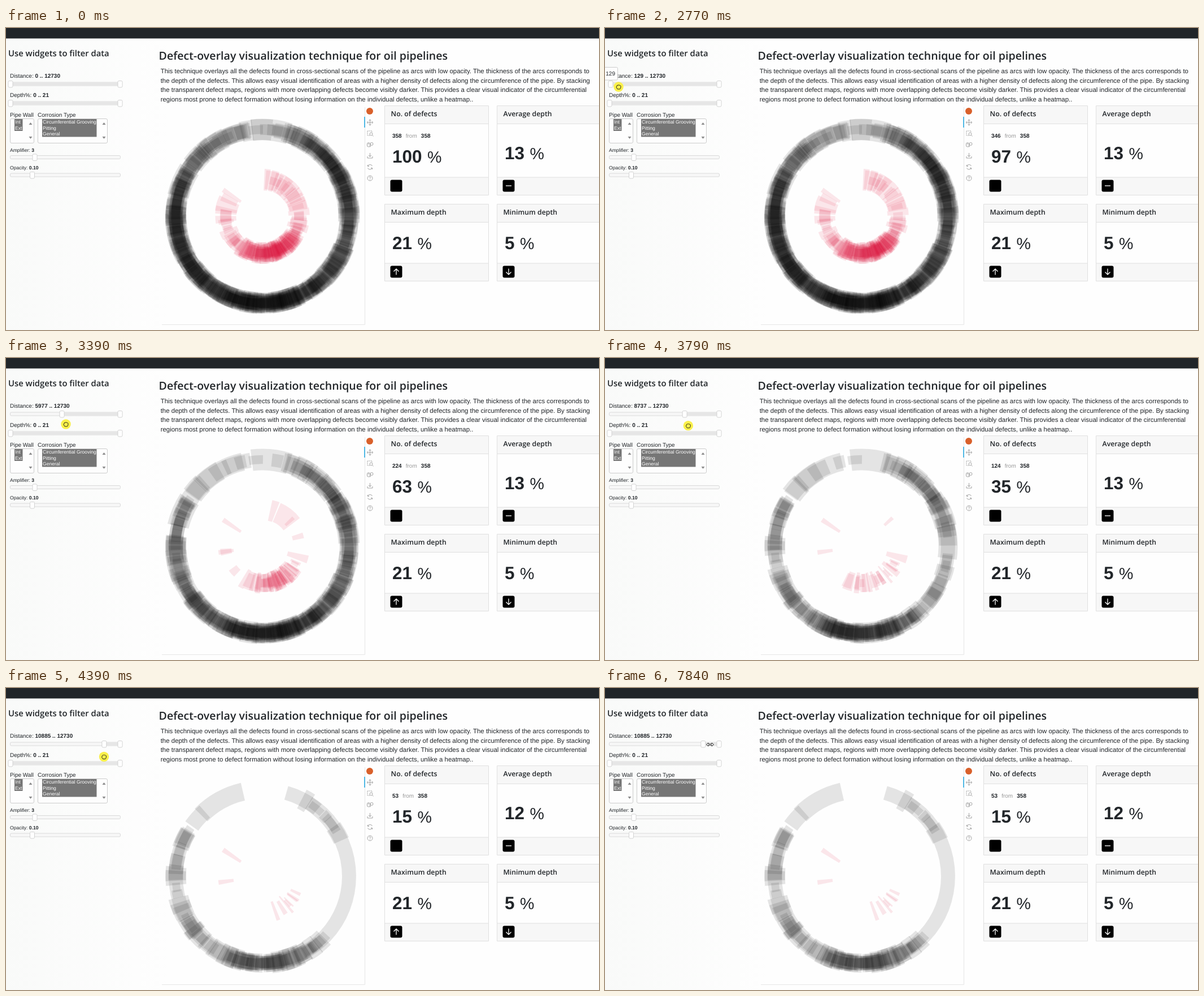
An HTML page with a canvas that plays this animation: 1050 px wide and 534 px high, repeating every 8 s.

```html
<!DOCTYPE html>
<html lang="en">
<head>
<meta charset="utf-8">
<title>Defect overlay</title>
<style>
html, body { margin: 0; width: 100%; height: 100%; overflow: hidden; background: #fefefe; }
body { position: relative; background: linear-gradient(90deg, #f9faf9, #fefefe 290px); }
canvas, svg { position: absolute; left: 0; top: 0; width: 1050px; height: 534px; }
text { font: 10px "Liberation Sans", Arial, sans-serif; fill: #212529; text-rendering: geometricPrecision; }
.title { font: 600 19.6px "Open Sans", sans-serif; }
.side { font: 600 14.8px "Open Sans", sans-serif; }
.head { font: 600 12.3px "Open Sans", sans-serif; }
.para { font-size: 11.44px; }
.small { font-size: 8.58px; }
.option { font-size: 8.58px; fill: #fff; }
.big { font-size: 31.5px; font-weight: bold; }
.unit { font-size: 28.6px; font-weight: normal; }
.bold { font-weight: bold; }
.from { fill: #999; }
.box { fill: #fefefe; stroke: #ccc; }
.track { fill: #f7f7f7; stroke: #d2d2d2; stroke-width: .8; }
.range { fill: #e6e6e6; }
.knob { fill: #fff; stroke: #cfcfcf; stroke-width: .9; }
.tools { fill: none; stroke: #a3a3a3; stroke-width: 1; }
.cursor { fill: #fff; stroke: #111; stroke-width: .9; stroke-linejoin: round; }
</style>
</head>
<body>
<canvas id="rings" width="1050" height="534"></canvas>
<svg viewBox="0 0 1050 534" xmlns="http://www.w3.org/2000/svg">
  <rect width="1050" height="18.5" fill="#212529"/>
  <text class="side" x="4" y="50">Use widgets to filter data</text>
  <text class="title" x="270.5" y="55.5">Defect-overlay visualization technique for oil pipelines</text>
  <g id="paragraph"></g>

  <text x="7" y="88">Distance: <tspan class="bold" id="distance"></tspan></text>
  <text x="7" y="122">Depth%: <tspan class="bold">0 .. 21</tspan></text>
  <text x="7" y="156.5">Pipe Wall</text>
  <text x="56" y="156.5">Corrosion Type</text>
  <text class="small" x="7" y="218.5">Amplifier: <tspan class="bold">3</tspan></text>
  <text class="small" x="7" y="250">Opacity: <tspan class="bold">0.10</tspan></text>
  <g id="sliders"></g>
  <g id="selects"></g>

  <path fill="none" stroke="#e6e6e6" d="M276 524.5H635.5V140"/>
  <circle cx="644" cy="147" r="6" fill="#d9602b"/>
  <path d="M635 157V176" stroke="#26aae1" stroke-width="1.6"/>
  <g class="tools">
    <path d="M639.5 167h10M644.5 162v10M641 165l-1.5 2l1.5 2M648 165l1.5 2l-1.5 2M642.5 163.5l2-1.5l2 1.5M642.5 170.5l2 1.5l2-1.5"/>
    <path stroke-dasharray="2 1" d="M644 190h-4v-8h8v2"/>
    <circle cx="646.5" cy="187.5" r="2.5"/><path d="M648.5 189.5l2 2"/>
    <rect x="639.5" y="203" width="5" height="7" rx="2"/><path d="M642 203v3M646 208l-1.5 2.5"/><circle cx="647.5" cy="205" r="2.5"/>
    <path d="M640 227v3h9v-3M644.5 221v6.5M642 225l2.5 2.5l2.5-2.5"/>
    <path d="M648.5 244a4.3 4.3 0 0 0-8 .5v-2.5M640.5 247.5a4.3 4.3 0 0 0 8 0v2.5M640.5 244.5h2.5M648.5 247.5h-2.5"/>
    <circle cx="644.5" cy="265.5" r="4.5"/><path d="M643 264.5q0-1.5 1.5-1.5t1.5 1.5q-.2.8-1.5 1.5v.5m0 1v1"/>
  </g>
  <g id="cards"></g>

  <g id="tip"><rect class="box" id="tipBox" y="69.5" height="22.5" rx="2"/><text id="tipText" y="83.5" text-anchor="middle"></text></g>
  <g id="pointer">
    <circle id="glow" r="8.7" fill="#faf04b"/>
    <path class="cursor" id="shape"/>
  </g>
</svg>
<script>
const $ = id => document.getElementById(id);
const LOOP = 8000, TOTAL = 358, MAX = 12730;
const sliderX = value => 8 + 194 * value / MAX;

$('paragraph').innerHTML = [
  'This technique overlays all the defects found in cross-sectional scans of the pipeline as arcs with low opacity. The thickness of the arcs corresponds to',
  'the depth of the defects. This allows easy visual identification of areas with a higher density of defects along the circumference of the pipe. By stacking',
  'the transparent defect maps, regions with more overlapping defects become visibly darker. This provides a clear visual indicator of the circumferential',
  'regions most prone to defect formation without losing information on the individual defects, unlike a heatmap..'
].map((line, i) => `<text class="para" x="273.7" y="${80.2 + i * 16.6}">${line}</text>`).join('');

const knob = (x, y, id) =>
  `<rect class="knob" ${id ? `id="${id}"` : ''} x="${x - 4}" y="${y - 5.5}" width="8" height="11.5" rx="2"/>`;
const slider = (y, from, to, id) =>
  `<rect class="track" x="7.5" y="${y - 3}" width="195" height="6" rx="2"/>` +
  (to ? `<rect class="range" ${id ? 'id="range"' : ''} x="${from}" y="${y - 2.5}" width="${to - from}" height="5"/>` + knob(to, y) : '') +
  knob(from, y, id);
$('sliders').innerHTML = slider(99, 8, 202, 'low') + slider(133, 8, 202) + slider(228.5, 51) + slider(260, 46.5);

const select = (x, width, textX, markWidth, options) => `
  <rect class="box" x="${x}" y="160.5" width="${width}" height="43" rx="2.5"/>
  <rect x="${textX - 1}" y="161" width="${markWidth}" height="${options.length * 10.5}" fill="#767676"/>
  <path fill="#8a8a8a" transform="translate(${x + width - 6})" d="M-3 171l3-4l3 4zM-3 192l3 4l3-4z"/>` +
  options.map((name, i) => `<text class="option" x="${textX}" y="${169.3 + i * 10.5}">${name}</text>`).join('');
$('selects').innerHTML = select(7.5, 42, 16, 14.5, ['Int', 'Ext']) +
  select(56.5, 123, 65, 96.5, ['Circumferential Grooving', 'Pitting', 'General']);

const card = (x, y, height, title, id, value, baseline, icon) => `
  <rect x="${x}" y="${y}" width="184" height="${height}" rx="3" fill="#fefefe" stroke="#e0e0e0"/>
  <path fill="#f7f7f7" stroke="#e0e0e0" d="M${x} ${y}h184v32h-184zM${x} ${y + height}h184v-31.5h-184z"/>
  <text class="head" x="${x + 11}" y="${y + 18.5}">${title}</text>
  <text class="big" x="${x + 13.5}" y="${baseline}"><tspan id="${id}">${value}</tspan><tspan class="unit" dx="9.5">%</tspan></text>
  <rect x="${x + 10}" y="${y + height - 27}" width="21" height="21" rx="3"/>
  <path transform="translate(${x + 20.5} ${y + height - 16.5})" d="${icon}" fill="none" stroke="#fff" stroke-width="1.3"/>`;
$('cards').innerHTML =
  card(670.5, 137.5, 158, 'No. of defects', 'percent', 100, 237.5, '') +
  card(869.5, 137.5, 158, 'Average depth', 'average', 13, 231.5, 'M-5 0H5') +
  card(670.5, 311.5, 136, 'Maximum depth', 'max', 21, 390.5, 'M0 5.5V-5M-4.5 -.5L0 -5L4.5 -.5') +
  card(869.5, 311.5, 136, 'Minimum depth', 'min', 5, 390.5, 'M0 -5.5V5M-4.5 .5L0 5L4.5 .5') +
  `<text x="684" y="193.5"><tspan class="bold" id="count"></tspan> <tspan class="from" dx="4.3">from</tspan> <tspan class="bold" dx="4.3">${TOTAL}</tspan></text>`;

// Seeded random numbers keep the defect map identical on every run.
let seed = 20;
const random = () => {
  seed = (seed + 0x6D2B79F5) | 0;
  let v = Math.imul(seed ^ seed >>> 15, 1 | seed);
  v = v + Math.imul(v ^ v >>> 7, 61 | v) ^ v;
  return ((v ^ v >>> 14) >>> 0) / 2 ** 32;
};

const ext = { radius: 153.5, color: 'rgba(0,0,0,.1)' };
const int = { radius: 65, color: 'rgba(220,20,60,.1)' };

// Angles are in degrees, clockwise from the right.
const arc = (wall, from, to, thick) => ({ wall, from, to, thick, order: random() });

// Scatters arcs so that they stack to base + bumps; a bump is [angle, layers, spread].
function scatter(wall, meanWidth, base, ...bumps) {
  const layersAt = angle => Math.max(0, bumps.reduce((sum, [mid, height, spread]) => {
    const distance = (angle - mid + 540) % 360 - 180;
    return sum + height * Math.exp(-((distance / spread) ** 2));
  }, base));
  const arcs = [];
  let due = random();
  for (let angle = 0; angle < 360; angle++) {
    for (due += layersAt(angle) / meanWidth; due >= 1; due--) {
      const half = meanWidth * (.25 + random() / 2);
      const mid = angle + (random() - .5) * 6;
      arcs.push(arc(wall, mid - half, mid + half, 13 + 26 * random()));
    }
  }
  return arcs;
}

// Farthest defects first; each group is complete once that many defects are shown.
const groups = [
  { upTo: 53, arcs: [
    arc(ext, 225, 257, 32), arc(ext, 286, 572, 25), arc(int, 211, 217, 38), arc(int, 169, 175, 27),
    ...scatter(ext, 10, 0, [92, 11, 26], [58, 6, 8], [143, 5, 11], [185, 3, 26], [208, 2.5, 5], [315, 2.5, 16]),
    ...scatter(int, 4, 0, [42, 1, 18])
  ] },
  { upTo: 74, arcs: [
    arc(ext, 263, 288, 38), arc(ext, 252, 259, 22), arc(ext, 340, 368, 34),
    ...scatter(ext, 10, 0, [302, 3, 12], [330, 2.5, 24], [95, 4, 30])
  ] },
  { upTo: 224, arcs: [
    arc(int, 293, 323, 36),
    ...scatter(ext, 13, 1, [45, 9, 55], [155, 4, 50], [335, 4, 30]),
    ...scatter(int, 9, .3, [72, 8, 28], [235, -1, 30])
  ] },
  { upTo: TOTAL, arcs: [
    ...scatter(ext, 14, 2.5, [150, 5, 60], [175, 4, 20], [225, 2, 25], [328, 5, 22]),
    ...scatter(int, 13, 2.4, [75, 12, 42], [238, -6, 27])
  ] }
];
groups.forEach(group => group.arcs.sort((a, b) => a.order - b.order));

const ctx = $('rings').getContext('2d');
function drawRings(shown) {
  ctx.clearRect(0, 0, 1050, 534);
  let before = 0;
  for (const { upTo, arcs } of groups) {
    const share = Math.min(1, Math.max(0, (shown - before) / (upTo - before)));
    for (const { wall, from, to, thick } of arcs.slice(0, Math.round(share * arcs.length))) {
      ctx.beginPath();
      ctx.arc(454, 333, wall.radius, from * Math.PI / 180, to * Math.PI / 180);
      ctx.lineWidth = thick;
      ctx.strokeStyle = wall.color;
      ctx.stroke();
    }
    before = upTo;
  }
}

const CURSORS = {
  arrow: 'M0 0V11.5L2.7 9L4.5 13L6.3 12.2L4.6 8.3H8Z',
  hand: 'M-2 5L-5 .5Q-5 -1 -3 .5V-3.5Q-2 -5 -1.3 -3.5Q-.3 -6 .8 -4Q2 -5 2.7 -3.2Q4.5 -4 4.5 -1.5Q4.5 3 2.7 5Z',
  grab: 'M-2 4L-4 .8Q-4 -.7 -3 -.6V-2Q-2 -3.7 -1 -2.6Q0 -4 1 -2.7Q2 -3.6 2.8 -2.2Q4 -2.3 4 -.5Q4 2.5 2.5 4Z',
  resize: 'M-6.5 0L-3 -3V-1H3V-3L6.5 0L3 3V1H-3V3Z'
};

// Each pose keeps what it does not change; between poses the pointer moves every 200 ms.
const FRAME = 200;
const poses = [
  { at: 0, cursor: '', x: 618, y: 418, low: 0, shown: TOTAL, tip: false },
  { at: 380, cursor: 'arrow' },
  { at: 1370, x: 23, y: 87 },
  { at: 1580, cursor: 'hand', x: 12, y: 93 },
  { at: 1980, x: 6, y: 98, tip: true },
  { at: 2180, cursor: 'grab', x: 8, y: 99 },
  { at: 2770, x: 24, y: 104, low: 129, shown: 346 },
  { at: 2970, x: 45, y: 109, low: 1820, shown: 312, tip: false },
  { at: 3390, x: 106, y: 117, low: 5977, shown: 224 },
  { at: 3990, x: 168, y: 121, low: 10117, shown: 74 },
  { at: 4390, x: 173.5, y: 121.5, low: 10885, shown: 53 },
  { at: 4590, cursor: 'hand' },
  { at: 5010, cursor: '', x: 172, y: 110 },
  { at: 5410, cursor: 'arrow' },
  { at: 6610 },
  { at: 7420, x: 188, y: 85 },
  { at: 7840, cursor: 'resize', x: 186, y: 100 }
];
poses.forEach((pose, i) => poses[i] = { ...poses[i - 1], ...pose });

function stateAt(time) {
  const index = poses.findLastIndex(pose => pose.at <= time);
  const pose = poses[index], next = poses[index + 1] || { ...pose, at: LOOP };
  const steps = Math.max(1, Math.round((next.at - pose.at) / FRAME));
  const progress = Math.floor((time - pose.at) / (next.at - pose.at) * steps) / steps;
  const mix = key => pose[key] + (next[key] - pose[key]) * progress;
  return { ...pose, x: mix('x'), y: mix('y'), low: Math.round(mix('low')), shown: Math.round(mix('shown')) };
}

const display = (id, on) => $(id).style.display = on ? '' : 'none';
const set = (id, attributes) => {
  for (const name in attributes) $(id).setAttribute(name, attributes[name]);
};

function render({ cursor, x, y, low, shown, tip }) {
  const lowX = sliderX(low), glow = cursor === 'grab';
  $('distance').textContent = `${low} .. ${MAX}`;
  set('low', { x: lowX - 4 });
  set('range', { x: lowX, width: 202 - lowX });
  $('count').textContent = shown;
  $('percent').textContent = Math.round(100 * shown / TOTAL);
  $('average').textContent = shown < 60 ? 12 : 13;
  drawRings(shown);

  const label = String(low || 1), width = label.length * 5.6 + 8;
  display('tip', tip);
  $('tipText').textContent = label;
  set('tipText', { x: lowX - .3 });
  set('tipBox', { x: lowX - width / 2, width });

  display('pointer', cursor);
  display('glow', glow);
  set('shape', { d: CURSORS[cursor] || '', fill: 'none' });
  $('shape').style.fill = glow ? 'none' : '';
  set('pointer', { transform: `translate(${x} ${y})` });
}

const start = performance.now();
let last;
function tick() {
  const state = stateAt((performance.now() - start) % LOOP);
  const key = JSON.stringify(state);
  if (key !== last) render(state);
  last = key;
  requestAnimationFrame(tick);
}
tick();
</script>
</body>
</html>
```
